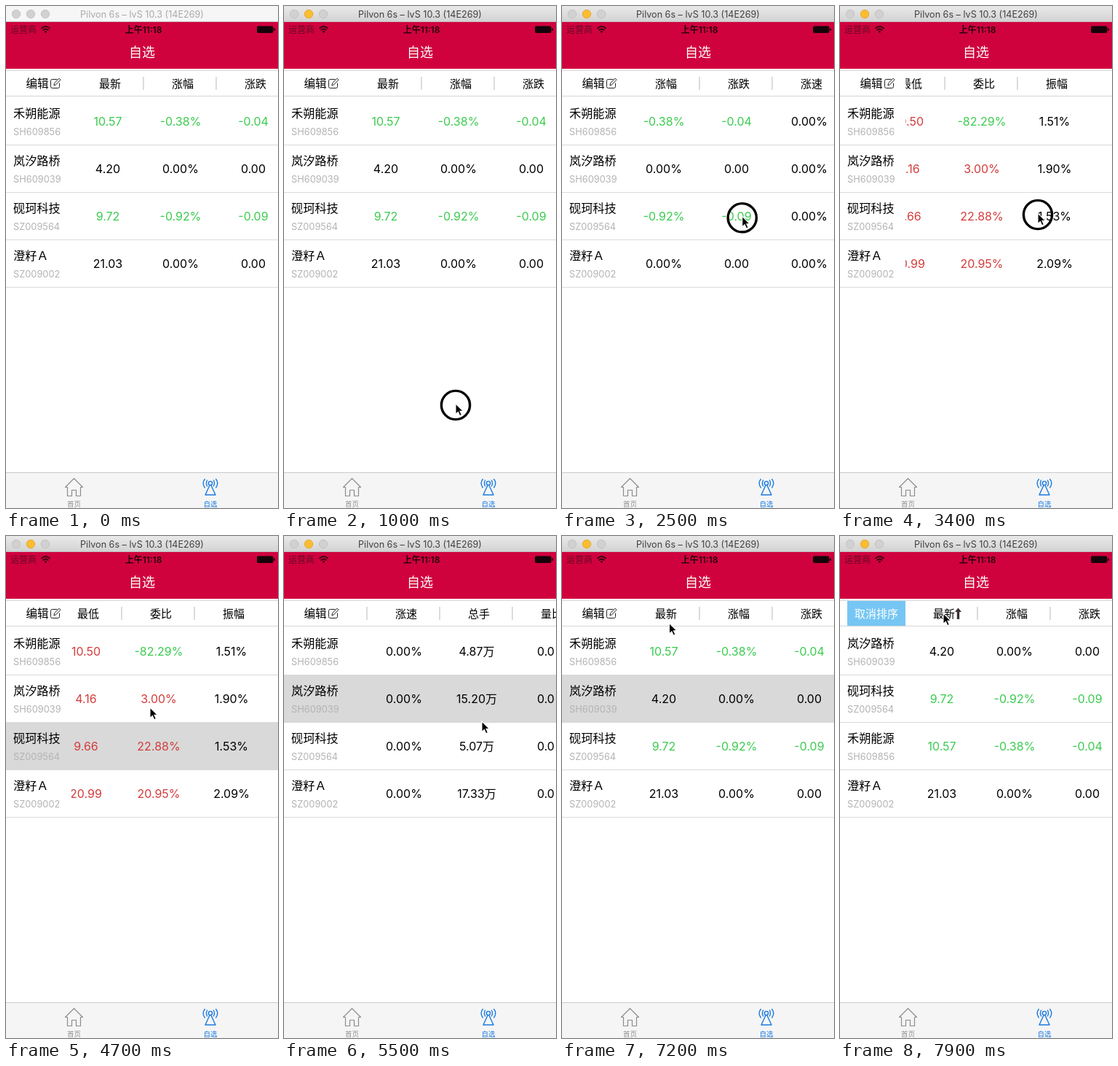
An HTML page for the animation above (8000 ms loop, 374 by 688 pixels).

```html
<!DOCTYPE html>
<html lang="zh-CN">
<head>
<meta charset="utf-8">
<title>自选</title>
<style>
  html, body { margin: 0; width: 100%; height: 100%; overflow: hidden; background: #fff; }
  svg { display: block; width: 100%; height: 100%; }
  text { font-family: Inter, "Noto Sans CJK SC", "Noto Sans CJK", sans-serif; }
  .mid { text-anchor: middle; }
  .value { font-size: 16px; }
  .name { font-size: 16.2px; }
  .code { font-size: 12.8px; fill: #b3b3b3; }
  .head { font-size: 15px; }
  .tab { font-size: 9.5px; }
  .line { fill: none; stroke-linecap: round; stroke-linejoin: round; }
</style>
</head>
<body>
<svg viewBox="0 0 374 688" xmlns="http://www.w3.org/2000/svg">
  <defs>
    <linearGradient id="chrome" x2="0" y2="1">
      <stop stop-color="#e9e9e9"/><stop offset="1" stop-color="#d2d2d2"/>
    </linearGradient>
    <clipPath id="listClip"><rect y="124" width="374" height="515"/></clipPath>
    <clipPath id="cellClip"><rect x="90" y="0" width="281" height="688"/></clipPath>
    <clipPath id="headClip"><rect x="90" y="88" width="284" height="36"/></clipPath>
  </defs>
  <rect width="374" height="688" fill="#fff"/>

  <g clip-path="url(#listClip)"><g id="list">
    <rect id="highlight" width="374" height="66" fill="#d9d9d9"/>
    <g id="lines" fill="#dadada"></g>
    <g id="names"></g>
    <g clip-path="url(#cellClip)"><g id="cells" class="value mid"></g></g>
  </g></g>

  <rect y="88" width="374" height="1" fill="#dadada"/>
  <rect y="123" width="374" height="1" fill="#d6d6d6"/>
  <g clip-path="url(#headClip)"><g id="heads" class="head mid"></g></g>
  <g id="edit">
    <text x="27.5" y="111.7" font-size="15.5">编辑</text>
    <path class="line" stroke="#222" d="M70 100.5H63.5Q61.5 100.5 61.5 102.5V110.5Q61.5 112.5 63.5 112.5H71.5Q73.5 112.5 73.5 110.5V106M66 108.5L66.6 105.7 73 99.2 75 101.2 68.6 107.8Z"/>
  </g>
  <g id="cancel">
    <rect x="10" y="89" width="80" height="34" fill="#76c6f4"/>
    <text class="head mid" x="50" y="111.5" fill="#fff">取消排序</text>
    <path d="M162.5 98.5L167 104H164.2V114H160.8V104H158Z" fill="#3b3030"/>
  </g>

  <rect y="22" width="374" height="64" fill="#d0023e"/>
  <text x="6" y="36.5" font-size="12" fill="#650a25">运营商</text>
  <g class="line" stroke="#3a0615" stroke-width="1.8">
    <path d="M49 30.5Q54.5 25.5 60 30.5M51.2 33Q54.5 30 57.8 33"/>
    <circle cx="54.5" cy="35.3" r=".6"/>
  </g>
  <text class="mid" x="189" y="36.5" font-size="12" font-weight="600" fill="#25030c">上午11:18</text>
  <rect x="345" y="27.5" width="22.5" height="9.5" rx="2" fill="#17020a"/>
  <rect x="368.3" y="30.5" width="1.7" height="3.6" rx=".8" fill="#17020a"/>
  <text class="mid" x="187" y="70" font-size="18" fill="#fff">自选</text>

  <rect id="bar" width="374" height="22"/>
  <rect y="21" width="374" height="1" fill="#c4bcbe"/>
  <g stroke-width=".8" stroke="#bdbdbd" fill="#d1d1d1">
    <circle cx="14" cy="11" r="5.7"/>
    <circle id="yellow" cx="34" cy="11" r="5.7"/>
    <circle cx="54" cy="11" r="5.7"/>
  </g>
  <text id="title" class="mid" x="187" y="15.7" font-size="12.6">Pilvon 6s – lvS 10.3 (14E269)</text>

  <rect y="639" width="374" height="49" fill="#f5f5f5"/>
  <rect y="639" width="374" height="1" fill="#cacaca"/>
  <path class="line" stroke="#8c8c8c" stroke-width="1.2" d="M81.5 659.5L93.5 647.5 105.5 659.5H102.5V671.5H96.5V663.5H90.5V671.5H84.5V659.5Z"/>
  <text class="tab mid" x="93.5" y="685.5" fill="#8e8e8e">首页</text>
  <g class="line" stroke="#1b7ae0" stroke-width="1.4">
    <circle cx="281" cy="654" r="2.6"/>
    <path d="M280 657L274 670H288L282 657M276.6 650Q274.3 654 276.6 658M285.4 650Q287.7 654 285.4 658M273.3 648.5Q269 654 273.3 660M288.7 648.5Q293 654 288.7 660"/>
  </g>
  <text class="tab mid" x="281" y="685.5" fill="#1b7ae0">自选</text>

  <g id="pointer">
    <circle id="ring" cy="2" r="19.6" fill="none" stroke="#000" stroke-width="3.4"/>
    <path d="M0 0V14.5L3.4 11.4 5.8 16.8 8.4 15.6 6 10.4H10.5Z" stroke="#fff" stroke-width="1.1"/>
  </g>
</svg>
<script>
const $ = id => document.getElementById(id);
const GREEN = '#3ccb50', RED = '#d43c3c', BLACK = '#000';
const LOOP = 8000, COL = 100, ROW = 65;

const stocks = [['禾朔能源', 'SH609856'], ['岚汐路桥', 'SH609039'], ['砚珂科技', 'SZ009564'], ['澄籽Ａ', 'SZ009002']];

// Header, colour letter per row, values per row.
const columns = [
  ['最新', 'gkgk', '10.57 4.20 9.72 21.03'],
  ['涨幅', 'gkgk', '-0.38% 0.00% -0.92% 0.00%'],
  ['涨跌', 'gkgk', '-0.04 0.00 -0.09 0.00'],
  ['涨速', 'kkkk', '0.00% 0.00% 0.00% 0.00%'],
  ['总手', 'kkkk', '4.87万 15.20万 5.07万 17.33万'],
  ['量比', 'kkkk', '0.00 0.00 0.00 0.00'],
  ['换手', 'kkkk', '0.43% 0.50% 0.86% 0.18%'],
  ['金额', 'kkkk', '5147万 6384万 4928万 3.64亿'],
  ['昨收', 'kkkk', '10.61 4.20 9.81 21.03'],
  ['开盘', 'kgkr', '10.61 4.18 9.81 21.10'],
  ['最高', 'rrrr', '10.66 4.24 9.81 21.43'],
  ['最低', 'rrrr', '10.50 4.16 9.66 20.99'],
  ['委比', 'grrr', '-82.29% 3.00% 22.88% 20.95%'],
  ['振幅', 'kkkk', '1.51% 1.90% 1.53% 2.09%']
];

function add(parent, tag, attrs, content = '') {
  const node = document.createElementNS('http://www.w3.org/2000/svg', tag);
  for (const key in attrs) node.setAttribute(key, attrs[key]);
  node.textContent = content;
  return parent.appendChild(node);
}

const rows = stocks.map(([name, code], i) => {
  add($('lines'), 'rect', { y: 190 + ROW * i, width: 374, height: 1 });
  const label = add($('names'), 'g', {});
  add(label, 'text', { class: 'name', x: 10, y: 152.5 }, name);
  add(label, 'text', { class: 'code', x: 10, y: 177 }, code);
  const cells = add($('cells'), 'g', {});
  columns.forEach(([, tones, values], c) => {
    const fill = { g: GREEN, r: RED, k: BLACK }[tones[i]];
    add(cells, 'text', { x: 140 + COL * c, y: 164.3, fill }, values.split(' ')[i]);
  });
  return [label, cells];
});

columns.forEach(([head], c) => {
  add($('heads'), 'text', { x: 143 + COL * c, y: 111.7 }, head);
  if (c < columns.length - 1) add($('heads'), 'rect', { x: 188 + COL * c, y: 97, width: 2, height: 18, fill: '#dcdcdc' });
});

// Keys are [time, ...values]; eased between neighbours.
function track(keys, t) {
  const next = keys.findIndex(k => k[0] > t);
  if (next === 0) return keys[0].slice(1);
  if (next < 0) return keys[keys.length - 1].slice(1);
  const [a, b] = [keys[next - 1], keys[next]];
  const u = (t - a[0]) / (b[0] - a[0]);
  const e = u * (2 - u) * .5 + u * .5;
  return a.slice(1).map((v, i) => v + (b[i + 1] - v) * e);
}

const pull = [[1000, 0], [1600, 91], [1800, 98], [1900, 50], [2000, 18], [2200, 0]];
const scroll = [[2400, 0], [2600, 160], [2800, 680], [3000, 1040], [3200, 1130], [3400, 1145], [3500, 1140], [3700, 1130],
  [5000, 1130], [5200, 1040], [5300, 850], [5500, 275], [5800, 0], [5950, -34], [6200, -16], [6500, -3], [6700, 0]];
const pointer = [[300, 300, 600], [900, 236, 548], [1000, 236, 545], [1600, 234, 348], [1800, 234, 330], [2300, 310, 290],
  [2400, 310, 290], [2700, 170, 286], [3100, 302, 285], [3200, 302, 285], [3400, 272, 284], [3600, 268, 283],
  [4000, 250, 270], [4700, 198, 235], [5000, 190, 238], [5400, 268, 253], [5500, 272, 254], [6500, 220, 285], [7300, 142, 107], [7900, 142, 106]];
const presses = [[1000, 1800], [2400, 2700], [3200, 3500], [3600, 3700], [4800, 4900], [5000, 5400], [7400, 7500]];

const move = (node, x, y) => node.setAttribute('transform', `translate(${x} ${y})`);
const show = (node, on) => node.setAttribute('visibility', on ? 'visible' : 'hidden');

function draw(time) {
  const t = Math.floor(time % LOOP / 100) * 100;
  const active = t >= 300, sorted = t >= 7500;
  $('bar').setAttribute('fill', active ? 'url(#chrome)' : '#f6f6f6');
  $('yellow').setAttribute('fill', active ? '#fcbd2f' : '#d1d1d1');
  $('yellow').setAttribute('stroke', active ? '#dfa023' : '#bdbdbd');
  $('title').setAttribute('fill', active ? '#404040' : '#a9a9a9');

  const x = -track(scroll, t)[0];
  move($('list'), 0, -track(pull, t)[0]);
  move($('cells'), x, 0);
  move($('heads'), x, 0);

  const order = sorted ? [1, 2, 0, 3] : [0, 1, 2, 3];
  order.forEach((stock, place) => rows[stock].forEach(node => move(node, 0, ROW * place)));
  $('highlight').setAttribute('y', t < 4800 ? 255 : 190);
  show($('highlight'), t >= 3600 && !sorted);
  show($('edit'), !sorted);
  show($('cancel'), sorted);

  move($('pointer'), ...track(pointer, t));
  show($('pointer'), active);
  show($('ring'), active && presses.some(([from, to]) => t >= from && t < to));
}

const start = performance.now();
function tick() {
  draw(performance.now() - start);
  requestAnimationFrame(tick);
}
tick();
</script>
</body>
</html>
```
